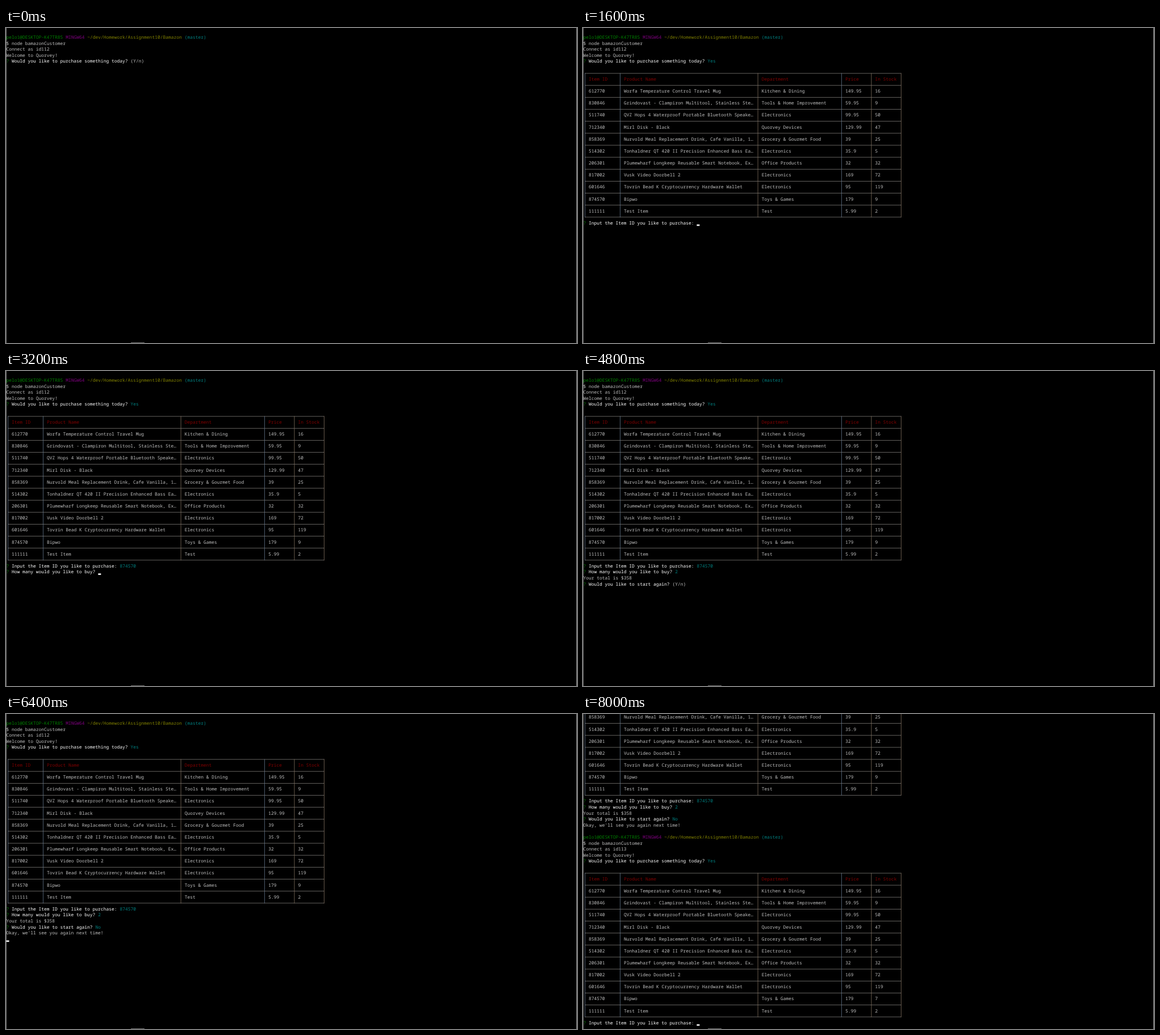
Recreate the animation shown at these times as an HTML page with a canvas. Size 1006x556 px, loop 9.6 s.

```html
<!DOCTYPE html>
<html lang="en">
<head>
<meta charset="utf-8">
<title>Terminal shop</title>
<style>
  html, body { margin: 0; width: 100%; height: 100%; overflow: hidden; background: #000; }
  canvas { display: block; }
</style>
</head>
<body>
<canvas id="stage" width="1006" height="556"></canvas>
<script>
const ctx = document.getElementById('stage').getContext('2d');
const WIDTH = 1006, HEIGHT = 556;
const CELL = 4.76, LINE = 10.575, LEFT = 0.5, FIRST_LINE = 16.2;
const STEP_MS = 1600;

const GRAY = '#c0c0c0', WHITE = '#fff', GREEN = '#008000', PURPLE = '#800080';
const OLIVE = '#808000', TEAL = '#008080', RED = '#800000';
const RULE = '#7c7a76', COOL_RULE = '#63758a', WARM_RULE = '#80705e';
const RULE_WIDTH = 0.8;

const RULE_COLS = [0, 13, 64, 95, 106, 117];
const RULE_COLORS = [COOL_RULE, COOL_RULE, WARM_RULE, COOL_RULE, WARM_RULE, WARM_RULE];
const HEADER = ['Item ID', 'Product Name', 'Department', 'Price', 'In Stock'];
const ITEMS = [
  '612770|Worfa Temperature Control Travel Mug|Kitchen & Dining|149.95|16',
  '830846|Grindovast - Clampiron Multitool, Stainless Ste…|Tools & Home Improvement|59.95|9',
  '511740|QVZ Hops 4 Waterproof Portable Bluetooth Speake…|Electronics|99.95|50',
  '712340|Mirl Disk - Black|Quorvey Devices|129.99|47',
  '858369|Nurvold Meal Replacement Drink, Cafe Vanilla, 1…|Grocery & Gourmet Food|39|25',
  '514302|Tonhaldner QT 420 II Precision Enhanced Bass Ea…|Electronics|35.9|5',
  '206301|Plumewharf Longkeep Reusable Smart Notebook, Ex…|Office Products|32|32',
  '817002|Vusk Video Doorbell 2|Electronics|169|72',
  '601646|Tovrin Bead K Cryptocurrency Hardware Wallet|Electronics|95|119',
  '874570|Bipwo|Toys & Games|179|9',
  '111111|Test Item|Test|5.99|2'
].map(row => row.split('|'));

let scroll = 0;
const colX = col => LEFT + col * CELL;
const lineY = line => FIRST_LINE + (line - scroll) * LINE;

function rect(x, y, w, h, color) {
  ctx.fillStyle = color;
  ctx.fillRect(x, y, w, h);
}

function put(line, col, text, color = GRAY) {
  ctx.fillStyle = color;
  ctx.fillText(text, colX(col), lineY(line) + 2.8);
}

// Prints [text, color] parts one after another.
function print(line, ...parts) {
  let col = 0;
  for (const [text, color] of parts) {
    put(line, col, text, color);
    col += text.length;
  }
  return col;
}

const ask = (line, question, answer = '', color = TEAL) =>
  print(line, ['? ', GREEN], [question + ' ', WHITE], [answer, color]);

function cursor(line, col) {
  rect(colX(col), lineY(line) + 2.7, 5, 2.6, WHITE);
}

function table(top, soldToys) {
  const rows = [HEADER, ...ITEMS];
  const ruleX = RULE_COLS.map(col => colX(col + 0.5) + 0.2);
  const ruleY = i => lineY(top + i * 2);
  const width = ruleX[5] - ruleX[0] + RULE_WIDTH;
  const height = ruleY(rows.length) - ruleY(0) + RULE_WIDTH;

  for (let i = 0; i <= rows.length; i++) rect(ruleX[0], ruleY(i), width, RULE_WIDTH, RULE);
  ruleX.forEach((x, i) => rect(x, ruleY(0), RULE_WIDTH, height, RULE_COLORS[i]));

  rows.forEach((row, r) => row.forEach((cell, c) => {
    const sold = row[0] === '874570' && c === 4 ? soldToys : 0;
    put(top + 1 + r * 2, RULE_COLS[c] + 2, sold ? String(cell - sold) : cell, r ? GRAY : RED);
  }));
}

function launch(line, id) {
  print(line, ['pelo1@DESKTOP-K47TR85 ', GREEN], ['MINGW64 ', PURPLE],
    ['~/dev/Homework/Assignment10/Bamazon ', OLIVE], ['(master)', TEAL]);
  put(line + 1, 0, '$ node bamazonCustomer');
  put(line + 2, 0, 'Connect as id' + id);
  put(line + 3, 0, 'Welcome to Quorvey!');
}

// One run of the shop; stage counts the answers given so far.
function session(line, id, stage, soldToys = 0) {
  launch(line, id);
  const buy = 'Would you like to purchase something today?';
  if (stage === 0) return ask(line + 4, buy, '(Y/n)', GRAY);
  ask(line + 4, buy, 'Yes');
  table(line + 6, soldToys);

  const itemEnd = ask(line + 31, 'Input the Item ID you like to purchase:', stage > 1 ? '874570' : '');
  if (stage === 1) return cursor(line + 31, itemEnd);

  const countEnd = ask(line + 32, 'How many would you like to buy?', stage > 2 ? '2' : '');
  if (stage === 2) return cursor(line + 32, countEnd);

  put(line + 33, 0, 'Your total is $358');
  const again = 'Would you like to start again?';
  if (stage === 3) return ask(line + 34, again, '(Y/n)', GRAY);
  ask(line + 34, again, 'No');
  put(line + 35, 0, "Okay, we'll see you again next time!");
  if (stage === 4) cursor(line + 36, 0);
}

function draw(time) {
  const step = Math.floor(time / STEP_MS) % 6;
  scroll = step === 5 ? 18 : 0;

  rect(0, 0, WIDTH, HEIGHT, '#000');
  rect(0, 0, 1, HEIGHT, '#777');
  rect(WIDTH - 1, 0, 1, HEIGHT, '#aaa');
  rect(220, HEIGHT - 1, 24, 1, '#777');

  ctx.font = '7.93px "Noto Sans Mono", "DejaVu Sans Mono", monospace';
  ctx.textRendering = 'geometricPrecision';
  ctx.textBaseline = 'alphabetic';
  session(0, 112, step);
  if (step === 5) session(37, 113, 1, 2);
}

const start = performance.now();
function tick() {
  draw(performance.now() - start);
  requestAnimationFrame(tick);
}
tick();
</script>
</body>
</html>
```
